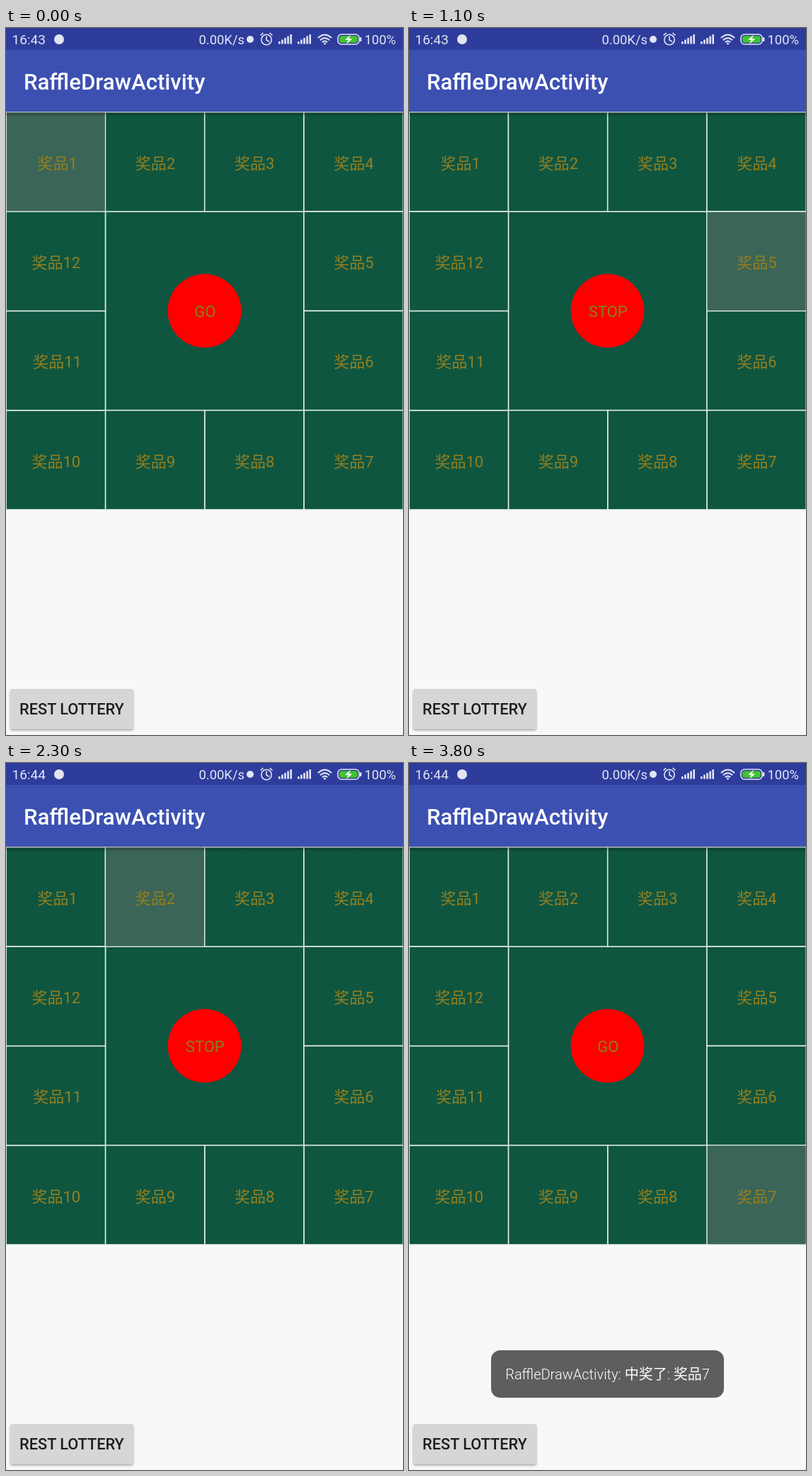
Recreate the animation shown at these times as an HTML page. Size 561x998 px, loop 3.9 s.

```html
<!DOCTYPE html>
<html lang="zh">
<head>
<meta charset="utf-8">
<title>Raffle</title>
<style>
  html, body { margin: 0; width: 100%; height: 100%; overflow: hidden; background: #f7f9f7; }
  svg { display: block; width: 561px; height: 998px; }
  text { font-family: Roboto, 'Noto Sans CJK SC', 'Noto Sans CJK', sans-serif; white-space: pre; }
  .status { font-size: 18.4px; fill: #e2e5f4; }
  .prize { font-size: 22px; fill: #967f1e; }
  .cell { fill: #0e5640; stroke: #e6efea; stroke-width: 1.5; }
  .icon { fill: none; stroke: #e2e5f4; stroke-width: 1.6; stroke-linecap: round; }
  .solid { fill: #e2e5f4; }
</style>
</head>
<body>
<svg viewBox="0 0 561 998">
  <defs>
    <linearGradient id="shade" x2="0" y2="1">
      <stop offset="0" stop-opacity=".32"/>
      <stop offset="1" stop-opacity="0"/>
    </linearGradient>
    <filter id="lift" x="-10%" y="-20%" width="120%" height="150%">
      <feDropShadow dx="0" dy="2" stdDeviation="1.6" flood-opacity=".35"/>
    </filter>
  </defs>

  <rect width="561" height="998" fill="#f7f9f7"/>
  <rect width="561" height="119" fill="#3c50b2"/>
  <rect width="561" height="31" fill="#2e3d9c"/>

  <text id="clock" class="status" x="8.5" y="23" style="font-size:19px"></text>
  <circle class="solid" cx="75" cy="16" r="7"/>
  <text class="status" x="272.5" y="22.5">0.00K/s</text>
  <circle class="solid" cx="345" cy="16" r="5"/>
  <g class="icon">
    <circle cx="368" cy="16.5" r="7.2"/>
    <path d="M368 12v5l3.5 2M360 10l3-2.6M376 10l-3-2.6"/>
  </g>
  <g id="bars" class="solid"></g>
  <g class="icon" stroke-width="2">
    <path d="M441.5 13.5q9-8 18 0M444.5 16.7q6-5 12 0M447.5 19.7q3-2.4 6 0" style="stroke-width:2.1"/>
  </g>
  <circle class="solid" cx="450.5" cy="22" r="1.5"/>
  <rect class="icon" x="469" y="9" width="30" height="14" rx="5"/>
  <rect x="471.2" y="11.2" width="25.6" height="9.6" rx="3" fill="#3fc52e"/>
  <rect class="solid" x="500" y="13" width="2.4" height="6" rx="1"/>
  <path d="M487 9.5l-8 7.3h4.6l-2.4 6 8-7.6h-4.6z" fill="#fff"/>
  <text class="status" x="506.5" y="22.5">100%</text>

  <text x="25" y="87" font-size="31.2" font-weight="500" fill="#fff">RaffleDrawActivity</text>

  <rect class="cell" x="140.5" y="259.2" width="280.5" height="280.5"/>
  <g id="cells"></g>
  <rect id="glow" width="138.7" height="138.7" fill="#3b6558"/>
  <g id="labels"></g>
  <rect y="118.5" width="561" height="7" fill="url(#shade)"/>

  <circle cx="280.5" cy="399.3" r="52" fill="#fe0000"/>
  <text id="go" class="prize" x="281.3" y="408" text-anchor="middle" style="fill:#89801f"></text>

  <rect x="6" y="933" width="174" height="56.5" rx="3" fill="#d6d7d5" filter="url(#lift)"/>
  <text x="93" y="969" font-size="21.8" font-weight="500" fill="#1c1d1c" text-anchor="middle">REST LOTTERY</text>

  <g id="toast">
    <rect x="116" y="829" width="329" height="67" rx="13" fill="#5c5f5c"/>
    <text x="280.5" y="870" font-size="20" font-weight="300" fill="#fff" text-anchor="middle">RaffleDrawActivity: 中奖了: 奖品7</text>
  </g>
</svg>

<script>
const $ = id => document.getElementById(id);
const LOOP = 3900, TICK = 100, SIZE = 140.25, TOP = 118.9;
const SPIN_FROM = 55, SPIN_TO = 2900, CELL_MS = 400 / 11;
const MINUTE_AT = 2100, TOAST_FROM = 3400, TOAST_TO = 3800;

// Clockwise position of prize i on the 4 x 4 ring.
function place(i) {
  const side = Math.floor(i / 3), k = i % 3;
  const [c, r] = [[k, 0], [3, k], [3 - k, 3], [0, 3 - k]][side];
  return { x: c * SIZE + .2, y: TOP + r * SIZE };
}

// Labels are centred on their ink, so a narrow "1" shifts them.
const inset = n => n === 1 ? 44.3 : n === 11 ? 38 : n > 9 ? 36.3 : 42.4;

let cells = '', labels = '', bars = '';
for (let i = 0; i < 12; i++) {
  const { x, y } = place(i);
  cells += `<rect class="cell" x="${x}" y="${y}" width="${SIZE}" height="${SIZE}"/>`;
  labels += `<text class="prize" x="${x + inset(i + 1)}" y="${y + 80}">奖品${i + 1}</text>`;
}
for (const left of [385, 412])
  for (let k = 0; k < 5; k++) {
    const h = 3.5 + k * 2.5;
    bars += `<rect x="${left + k * 4.1}" y="${22.5 - h}" width="2.6" height="${h}"/>`;
  }
$('cells').innerHTML = cells;
$('labels').innerHTML = labels;
$('bars').innerHTML = bars;

function draw(ms) {
  const t = Math.floor(ms % LOOP / TICK) * TICK;
  const spun = Math.max(0, Math.min(t, SPIN_TO) - SPIN_FROM);
  const { x, y } = place(Math.floor(spun / CELL_MS) % 12);
  $('glow').setAttribute('x', x + .8);
  $('glow').setAttribute('y', y + .8);
  $('go').textContent = t > SPIN_FROM && t < SPIN_TO ? 'STOP' : 'GO';
  $('clock').textContent = t < MINUTE_AT ? '16:43' : '16:44';

  const u = (t - TOAST_FROM) / (TOAST_TO - TOAST_FROM);
  const rest = (1 - Math.max(0, Math.min(1, u))) ** 2;
  $('toast').setAttribute('opacity', 1 - rest);
  $('toast').setAttribute('transform', `translate(0 ${128 * rest})`);
}

const start = performance.now();
function loop() {
  draw(performance.now() - start);
  requestAnimationFrame(loop);
}
loop();
</script>
</body>
</html>
```
